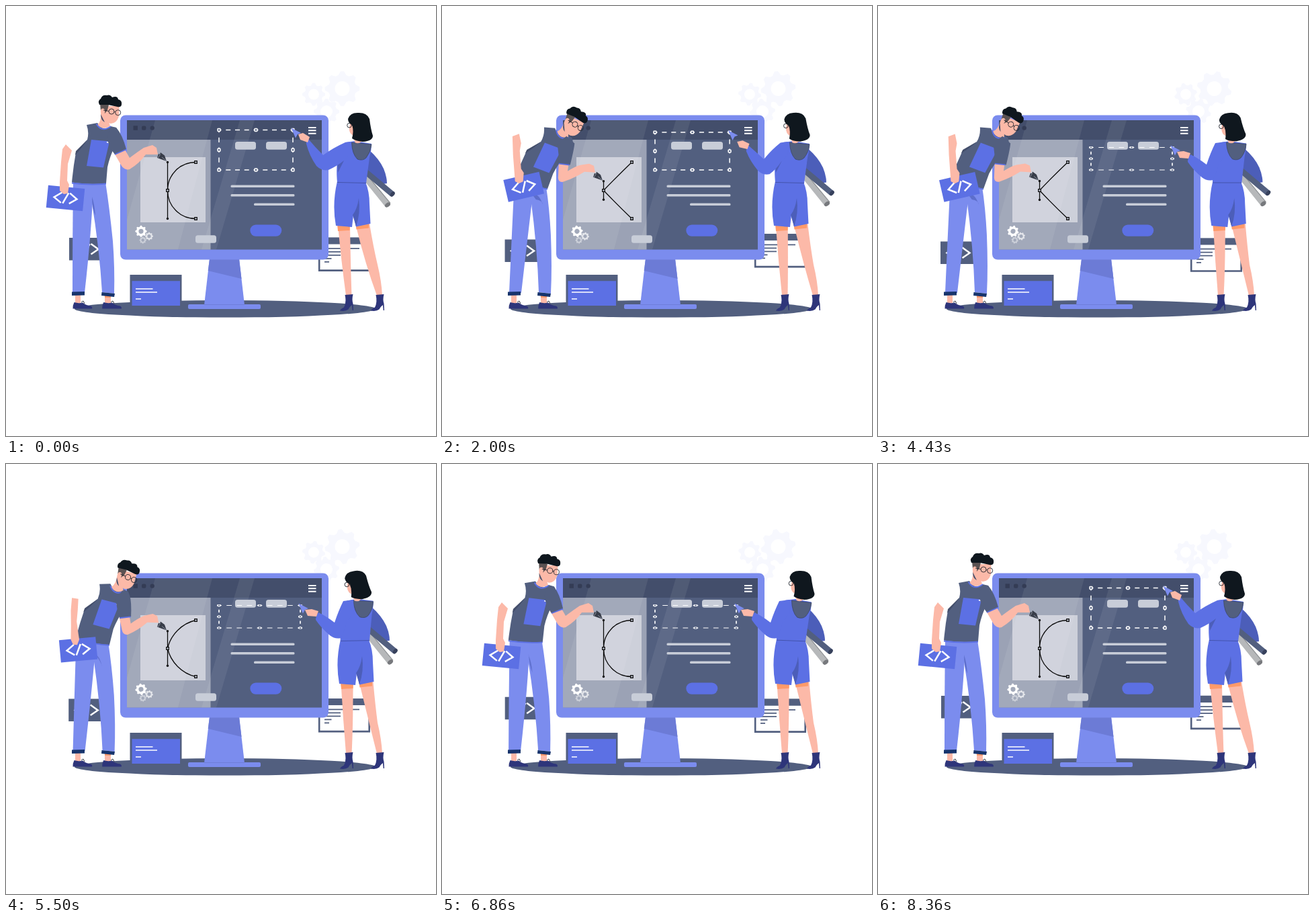
These frames come from a looping animation (640x640 px, 8430 ms). An HTML page:

```html
<!DOCTYPE html>
<html lang="en">
<head>
<meta charset="utf-8">
<title>Design studio</title>
<style>
html,body{margin:0;width:100%;height:100%;overflow:hidden;background:#fff}
svg{display:block;width:100vw;height:100vh}
.slate{fill:#525f7f}.navy{fill:#434e6b}.blue{fill:#5c70e4}.lilac{fill:#7b8cee}
.deep{fill:#4c5eb9}.skin{fill:#fcb9a8}.shoe{fill:#2e357a}.hair{fill:#0f171e}
.pale{fill:#c8cdd8}.white{fill:#fff}.cuff{fill:#17346c}.orange{fill:#ff9a6a}
.line{fill:none;stroke:#fff;stroke-width:2}
.thin{fill:none;stroke:#20252e;stroke-width:.9}
</style>
</head>
<body>
<svg viewBox="0 0 640 640">
  <defs><path id="tag" class="line" style="stroke-width:2.5" d="M-6 -8L-17 0L-6 7.500M4 -8L-3.500 8M6 -8L17 0L6 7.500"/></defs>
  <g id="bigGears" fill="#f7f8fe"></g>
  <ellipse class="slate" cx="326" cy="450.800" rx="224" ry="12.800"/>
  <g id="codeWin">
    <path class="slate" d="M94 345h64v33.500h-64z"/>
    <use href="#tag" x="120.500" y="362"/>
  </g>
  <g id="textWin">
    <path fill="#fff" stroke="#525f7f" stroke-width="2.600" d="M466.200 346.500h74.500v47.800h-74.500z"/>
    <path class="slate" d="M465 345.500h77v9.800h-77z"/>
    <path d="M474 361.500h52M474 366.500h24M474 371.500h24M474 376.600h10.500M474 381.600h7" stroke="#525f7f" stroke-width="1.700"/>
  </g>

  <!-- monitor -->
  <path class="lilac" d="M303 376H347L355 445H295Z"/>
  <path fill="#6c7bd6" d="M303 377H347L350.500 406L300.700 394Z"/>
  <rect class="lilac" x="271" y="444" width="108" height="7" rx="2"/>
  <path d="M295 444.500h60" stroke="#6c7bd6" stroke-width=".8"/>
  <rect class="lilac" x="170" y="162.500" width="310" height="215" rx="8"/>
  <path class="slate" d="M180 170h290v192.500h-290z"/>
  <path class="navy" d="M180 170h290v29h-290z"/>
  <path fill="#fff" fill-opacity=".42" d="M180 199h124.500v163.500h-124.500z"/>
  <path fill="#fff" fill-opacity=".5" d="M200 225h97v97h-97z"/>
  <g fill="#fff" fill-opacity=".07">
    <path d="M222 170H307L256 362.500H180V318Z"/>
    <path d="M348 170H370L313 362.500H291Z"/>
  </g>
  <g fill="#343c55">
    <path d="M189.500 178.300h6.500v6.500h-6.500z"/>
    <rect x="202" y="178.400" width="6.400" height="6.400" rx="2"/>
    <circle cx="217.700" cy="181.600" r="3.200"/>
  </g>
  <path class="line" d="M450 181h11.500M450 185.300h11.500M450 189.700h11.500"/>
  <g class="pale">
    <rect x="341" y="202" width="31" height="11.700" rx="3.500"/>
    <rect x="387" y="202" width="31" height="11.700" rx="3.500"/>
    <rect x="334.500" y="266.500" width="95" height="3.400" rx="1.500"/>
    <rect x="334.500" y="280" width="95" height="3.400" rx="1.500"/>
    <rect x="369" y="293.500" width="60.500" height="3.400" rx="1.500"/>
    <rect x="282" y="341.300" width="31" height="11.500" rx="3.500"/>
  </g>
  <rect class="blue" x="363.300" y="325.500" width="47" height="17.200" rx="8.600"/>
  <g id="smallGears" fill="#fff"></g>
  <g id="box">
    <path class="line" style="stroke-width:1.500" stroke-dasharray="7 6.750" stroke-dashoffset="3.500" d="M0 0H110M0 -60H110"/>
    <path class="line" style="stroke-width:1.500" stroke-dasharray="7.500 7.500" stroke-dashoffset="3.750" d="M0 0V-60M110 0V-60"/>
    <g id="knobs"></g>
  </g>
  <path id="curve" fill="none" stroke="#0a0a0a" stroke-width="1.300"/>
  <path id="handle" fill="none" stroke="#0a0a0a" stroke-width="1.300"/>
  <g id="ends" fill="#0a0a0a"><circle r="1.700" cx="240.500"/><circle r="1.700" cx="240.500"/></g>
  <path fill="#b8bdca" stroke="#0a0a0a" stroke-width="1.200" d="M238.700 272.700h3.600v3.600h-3.600zM280.700 230.700h3.600v3.600h-3.600zM280.700 314.700h3.600v3.600h-3.600z"/>

  <path class="slate" d="M184.500 400h77v47.500h-77z"/>
  <path class="blue" d="M187.500 409.300h71.500v36.700h-71.500z"/>
  <path class="line" style="stroke-width:1.700" d="M193 421h25.500M193 426h32M193 436h8"/>

  <!-- man -->
  <path class="skin" d="M103 430h8v12h-8zM147 431h9v11h-9z"/>
  <path class="orange" d="M147 431h9v3h-9z"/>
  <path id="shoe" class="shoe" d="M101.500 441Q108 443 114 441.500Q120 446 126 446.500Q129 448 128 450.500H99.500Q99 446 101.500 441Z"/>
  <use href="#shoe" x="43.700"/>
  <path class="thin" stroke-width=".7" d="M112 441l3 -2l2 4M156 441l3 -2l2 4"/>
  <path id="legR" class="lilac"/>
  <path id="legL" class="lilac"/>
  <path id="legShade" fill="#5d6ecb"/>
  <path class="cuff" d="M98 425.500L117 425V430.500L98 431ZM142.500 426L162 428L161 433L142 431Z"/>
  <path id="armR" class="skin"/>
  <g id="torso">
    <path class="slate" d="M120 177L136 174Q145 188 156 179L164 181Q172 192 163 206Q154 225 151 240L149 264Q124 266 98 262.500Q100 240 104 218L121 199Q124 188 120 177Z"/>
    <path class="navy" d="M104 216L121 199Q114 210 103 222Z"/>
    <path fill="none" stroke="#5c70e4" stroke-width="1.800" d="M98 263.500Q124 267 149 264.500"/>
    <path class="blue" d="M127 199L154 201.500L145 240.500L120 238Z"/>
    <path class="white" d="M150 202l3.500 .3l-.8 2l-3 -1z"/>
  </g>
  <g id="card">
    <path class="blue" d="M-27.300 -16.700h54.600v33.400h-54.600z"/>
    <use href="#tag"/>
  </g>
  <path id="armL" class="skin"/>
  <g id="head">
    <path class="skin" d="M141 158L150 166L155 178Q145 186 136 177Q142 173 141 158Z"/>
    <path fill="none" stroke="#5c70e4" stroke-width="2" d="M134.500 175.500Q143 189 156 179"/>
    <path class="navy" d="M141 161L147 173Q141 170 141 161Z"/>
    <path class="skin" d="M143 149H168.500L168 164Q165 174.500 156 175Q147 174 145 163Z"/>
    <path fill="#5b5252" d="M140 145L153 147L151 155L147 160L141 156Z"/>
    <ellipse class="skin" cx="144" cy="157" rx="3.200" ry="4.600"/>
    <path class="hair" d="M139 147Q136 141 141 138Q143 132 150 133Q155 131 158 136Q166 133 167 139Q173 140 172 147Q171 151 166 150L152 147Z"/>
    <circle class="thin" cx="157" cy="157" r="4"/><circle class="thin" cx="166.700" cy="158.700" r="4"/>
    <path class="thin" d="M161 157.500l1.800 .4M153 156.500L145 155"/>
  </g>
  <path id="sleeve" class="slate"/>
  <path id="hem" fill="none" stroke="#5c70e4" stroke-width="1.800"/>
  <g id="pen">
    <path fill="#383d49" d="M0 0L-3 -8.500L-9 -13L-10 -10L-12 -11L-14 -5Z"/>
    <path d="M-1 -1L-7 -6M-9.500 -10L-13 -4.500" stroke="#aab0c0" stroke-width=".7"/>
  </g>

  <!-- woman -->
  <path id="calfL" class="skin"/>
  <path id="calfR" class="skin"/>
  <path id="boot" class="shoe" d="M504.500 430L516.500 429Q514.500 437 516.500 443L517 453H515.700L514.800 445Q511 448 509.500 451.500Q505 455 497 453.500Q498 451 503 448.500Q507 441 504.500 430Z"/>
  <use href="#boot" x="46"/>
  <g id="back">
    <path class="deep" d="M540 214Q555 227 562 242Q567 254 567 264L555 266L536 245Z"/>
    <path d="M531 250L568 296" stroke="#b6b8ba" stroke-width="9"/>
    <path d="M536 250L572 293.500" stroke="#8f9295" stroke-width="1.200"/>
    <ellipse fill="#77797d" cx="568" cy="296" rx="4.500" ry="3" transform="rotate(-38 568 296)"/>
    <path d="M532 244L575 280" stroke="#525f7f" stroke-width="8.600"/>
    <ellipse fill="#37415c" cx="575.300" cy="280" rx="4.300" ry="2.800" transform="rotate(-50 575.300 280)"/>
  </g>
  <g id="hips">
    <path class="orange" d="M493 325L512 326L511.500 334L494 335ZM520.500 325L540 323V330.500L521.500 332.500Z"/>
    <path class="blue" d="M493 261L535 262Q541 276 541 295L542.500 324L521 328.500L517 311L515 329L491 327Q485 295 493 261Z"/>
    <path class="deep" d="M525 286Q528 308 521 328L516 311Q523 302 525 286Z"/>
  </g>
  <g id="chest">
    <path class="blue" d="M505 203L520 201L544 205Q544 215 541 226L536 264L493 263Q491 240 494 222Z"/>
    <path class="deep" d="M493 233L503 230L494 248Z"/>
    <path fill="none" stroke="#3e4d9e" stroke-width=".8" d="M493 262.500L536 263.500"/>
    <path class="slate" stroke="#39445f" stroke-width=".7" d="M514.500 203L544 206Q543 217 536 226Q531 231 523 228Q515 220 514.500 203Z"/>
  </g>
  <path id="reach" class="blue"/>
  <path id="cursor" class="lilac" d="M-2.500 -3L12 4.500L7 6.500L4 12Z"/>
  <path id="hand" class="skin"/>
  <g id="face">
    <path class="skin" d="M514 168L511 180Q510 190 517 193L519 203Q525 206 529 202L528 180Z"/>
    <circle class="thin" cx="511" cy="177.700" r="3.300"/>
    <path class="thin" d="M514 177.500h6"/>
    <path class="hair" d="M509 168Q512 159 523 159Q537 158 541 168Q543 184 546 193Q546 201 531 202Q520 201 515 197Q518 186 515 177Q509 174 509 168Z"/>
  </g>
</svg>
<script>
const LOOP = 8430;
const $ = id => document.getElementById(id);
const set = (id, name, value) => $(id).setAttribute(name, value);
const move = (id, value) => set(id, 'transform', value);
const num = n => n.toFixed(2);

// Smooth curve through [time, value] steps, without overshoot.
function track(steps) {
  const slope = i => (steps[i + 1][1] - steps[i][1]) / (steps[i + 1][0] - steps[i][0]);
  const tan = steps.map((_, i) => {
    if (!i || i === steps.length - 1) return 0;
    const a = slope(i - 1), b = slope(i);
    return a * b <= 0 ? 0 : 2 * a * b / (a + b);
  });
  return t => {
    let i = 0;
    while (i < steps.length - 2 && t >= steps[i + 1][0]) i++;
    const [t0, v0] = steps[i], [t1, v1] = steps[i + 1];
    const d = t1 - t0, u = (t - t0) / d, w = 1 - u;
    return v0 * w * w * (1 + 2 * u) + v1 * u * u * (3 - 2 * u) + d * u * w * (w * tan[i] - u * tan[i + 1]);
  };
}

// Blend of two path strings with the same commands.
function blend(a, b) {
  const to = b.match(/-?[\d.]+/g);
  return k => {
    let i = 0;
    return a.replace(/-?[\d.]+/g, n => num(+n + (to[i++] - n) * k));
  };
}

const lean = track([[0, 0], [250, .06], [600, .35], [930, .7], [1070, .84], [1400, .92], [2000, .98], [3290, 1], [5140, .94], [5500, .59], [5800, .18], [6000, .02], [6860, .09], [8360, 0], [LOOP, 0]]);
const draw = track([[0, 0], [250, .05], [600, .4], [930, .74], [1070, .85], [2000, .99], [3290, 1], [5140, .95], [5500, .57], [5800, .15], [6000, 0], [LOOP, 0]]);
const boxTop = track([[0, 184.5], [1070, 181], [1500, 181.5], [2000, 188], [2600, 210.5], [6880, 210.5], [7300, 199], [7750, 187], [8360, 184.5], [LOOP, 184.5]]);
const reachDown = track([[0, 0], [1070, 0], [2000, .42], [2600, 1], [6880, 1], [7300, .55], [7750, .1], [8360, 0], [LOOP, 0]]);
const hipX = track([[0, 0], [1070, 0], [2000, 3], [2600, 8], [3290, 6], [5500, 5], [6860, 5], [7750, 1], [8360, 0], [LOOP, 0]]);
const chestX = track([[0, 0], [1070, -1], [2000, 3], [2600, 9], [3290, 7], [5500, 2.5], [6860, 6], [7750, 1], [8360, 0], [LOOP, 0]]);
const backX = track([[0, 0], [1070, -1], [2000, 5], [2600, 12], [3290, 8], [5500, 4], [6860, 3], [8360, 0], [LOOP, 0]]);
const headX = track([[0, 0], [1070, -3], [2000, 2], [2600, 8], [3290, 7], [5500, -1], [6860, 8.5], [7750, 1], [8360, 0], [LOOP, 0]]);
const headTurn = track([[0, 0], [1070, -1], [2000, -3], [3290, -5], [5500, -7], [6860, 0], [LOOP, 0]]);

const shapes = {
  legR: blend('M124 262L148 262Q154 300 159 350Q162 390 161 428L143 426Q139 360 127 288Z', 'M130 268L155 268Q160 300 162 340Q164 390 162 428L144 426Q142 360 132 285Z'),
  legL: blend('M100 262L130 262Q128 330 117 427L99 427Q99 340 100 262Z', 'M107 270L137 266Q128 340 118 427L100 427Q104 340 107 280Z'),
  legShade: blend('M128 284Q132 296 133 312Q128 300 128 284Z', 'M134 280L145 278Q150 295 150 289Q140 288 134 280Z'),
  armL: blend('M89 206L98 215L92 235L91 260L94 266L92 279L86 280L80 275L80 262L82 232L84 213Z', 'M105 194L115 190L118 204L116 215L118 242L122 248L121 261L115 264L109 261L108 248L106 222L104 205Z'),
  armR: blend('M161 219L176 212L184 226Q196 217 205 211L218 207L224 211L226 221L208 221Q199 234 184 243Q177 245 172 238Z', 'M174 233L189 234L187 246Q198 239 206 237L219 235L226 238L228 248L212 247Q196 257 180 262Q172 263 173 254Z'),
  sleeve: blend('M156 180L164 181Q173 191 179 213L162 221L154 210L150 194Z', 'M186 194L198 205Q197 214 191 237L174 235L174 222L172 204Z'),
  hem: blend('M162 221L179 213.500', 'M174 235L190 237')
};
const calves = {
  calfL: blend('M494 326L512 327Q513 390 514.500 431L506 431Q499 380 494 326Z', 'M499 326L517 327Q517 390 514.500 431L506 431Q502 380 499 326Z'),
  calfR: blend('M521 328L541 324Q547 360 553 385Q559 410 560 431L552 431Q535 385 521 328Z', 'M527 328L547 324Q550 360 553 385Q559 410 560 431L552 431Q541 385 527 328Z')
};
const arm = {
  reach: blend('M513 202L505 203Q487 211 472 222Q460 210 450 198Q446 202 447 205Q451 222 462 238Q470 246 480 244Q493 238 503 230L512 222Z', 'M517 202L502 204Q495 218 489 236Q476 226 465 221Q461 226 461 232Q469 244 482 255Q490 261 498 259Q504 250 507 235L518 222Z'),
  hand: blend('M452 195L442 189L435 191L438 199L449 203Z', 'M465 219L455 216L445 217L449 226L462 227Z')
};
const curveTop = blend('M282.500 232.500C259 232.500 240.500 251 240.500 274.500', 'M282.500 232.500C268.500 246.500 254.500 260.500 240.500 274.500');
const curveEnd = blend('C240.500 298 259 316.500 282.500 316.500', 'C254.500 288.500 268.500 302.500 282.500 316.500');

function gearPath(r, hole) {
  let d = '';
  for (let i = 0; i < 32; i++) {
    const a = (i - 1.5) * Math.PI / 16, R = i % 4 === 1 || i % 4 === 2 ? r : r * .8;
    d += (i ? 'L' : 'M') + num(R * Math.sin(a)) + ' ' + num(-R * Math.cos(a));
  }
  return `${d}ZM${hole} 0A${hole} ${hole} 0 1 0 ${-hole} 0A${hole} ${hole} 0 1 0 ${hole} 0Z`;
}
function add(parent, tag, attrs) {
  const el = document.createElementNS('http://www.w3.org/2000/svg', tag);
  for (const k in attrs) el.setAttribute(k, attrs[k]);
  return $(parent).appendChild(el);
}
const gears = [
  ['bigGears', 500.5, 123, 26, 11, 1], ['bigGears', 458, 131.5, 17, 8, 1], ['bigGears', 477, 157, 19, 9, 1],
  ['smallGears', 201, 335.3, 8.6, 3.6, 1], ['smallGears', 213, 342.7, 6, 2.6, .7], ['smallGears', 203.7, 348.5, 5.2, 2.2, .45]
].map(([parent, x, y, r, hole, opacity], i) => ({
  x, y, dir: i % 3 === 1 ? -1 : 1,
  el: add(parent, 'path', { d: gearPath(r, hole), 'fill-rule': 'evenodd', opacity })
}));

for (const x of [0, 55, 110]) for (const y of [0, -30, -60]) {
  if (x === 55 && y === -30) continue;
  add('knobs', 'rect', { x: x - 1.9, y: y - 1.9, width: 3.8, height: 3.8, rx: .6, fill: '#525f7f', stroke: '#fff', 'stroke-width': 1.5 });
}

function render(t) {
  const k = lean(t), p = draw(t), top = boxTop(t), phase = t / LOOP * 2 * Math.PI;
  const right = 427 + (top - 184.5) * .42;

  for (const g of gears) g.el.setAttribute('transform', `translate(${g.x} ${g.y}) rotate(${g.dir * 540 * t / LOOP})`);
  move('codeWin', `translate(${num(-.5 + .5 * Math.cos(phase))} ${num(2.8 - 2.8 * Math.cos(phase))})`);
  move('textWin', `translate(0 ${num(-.7 - 5.5 * Math.sin(phase))})`);
  move('box', `translate(317 244) scale(${num((right - 317) / 110)} ${(244 - top) / 60})`);

  const half = 42 - 28.5 * p;
  set('curve', 'd', curveTop(p * p) + curveEnd(p * p));
  set('handle', 'd', `M240.500 ${274.5 - half}V${274.5 + half}`);
  [...$('ends').children].forEach((c, i) => c.setAttribute('cy', 274.5 + (i ? half : -half)));

  for (const id in shapes) set(id, 'd', shapes[id](id.startsWith('arm') ? p : k));
  move('card', `translate(${88.5 + 33.5 * p} ${286 - 17 * p}) rotate(${5.5 - 18.8 * p})`);
  move('torso', `translate(${20.5 * k} ${6.5 * k}) rotate(${15.5 * k} 136.500 220)`);
  move('head', `translate(${41 * k} ${21.5 * k}) rotate(${23 * k} 162 158)`);
  move('pen', `translate(239 ${231 + 29 * p})`);

  const hip = hipX(t), chest = chestX(t), reach = reachDown(t);
  for (const id in calves) set(id, 'd', calves[id](hip / 5.5));
  for (const id in arm) set(id, 'd', arm[id](reach));
  move('hips', `translate(${hip} 0)`);
  move('chest', `translate(${hip} 0) rotate(${(chest - hip) * .95} 515 263)`);
  move('back', `translate(${backX(t)} ${-.3 * backX(t)})`);
  move('face', `translate(${headX(t)} 0) rotate(${headTurn(t)} 524 200)`);
  move('cursor', `translate(${right} ${top})`);
}

const start = performance.now();
function tick() {
  render((performance.now() - start) % LOOP);
  requestAnimationFrame(tick);
}
tick();
</script>
</body>
</html>
```
